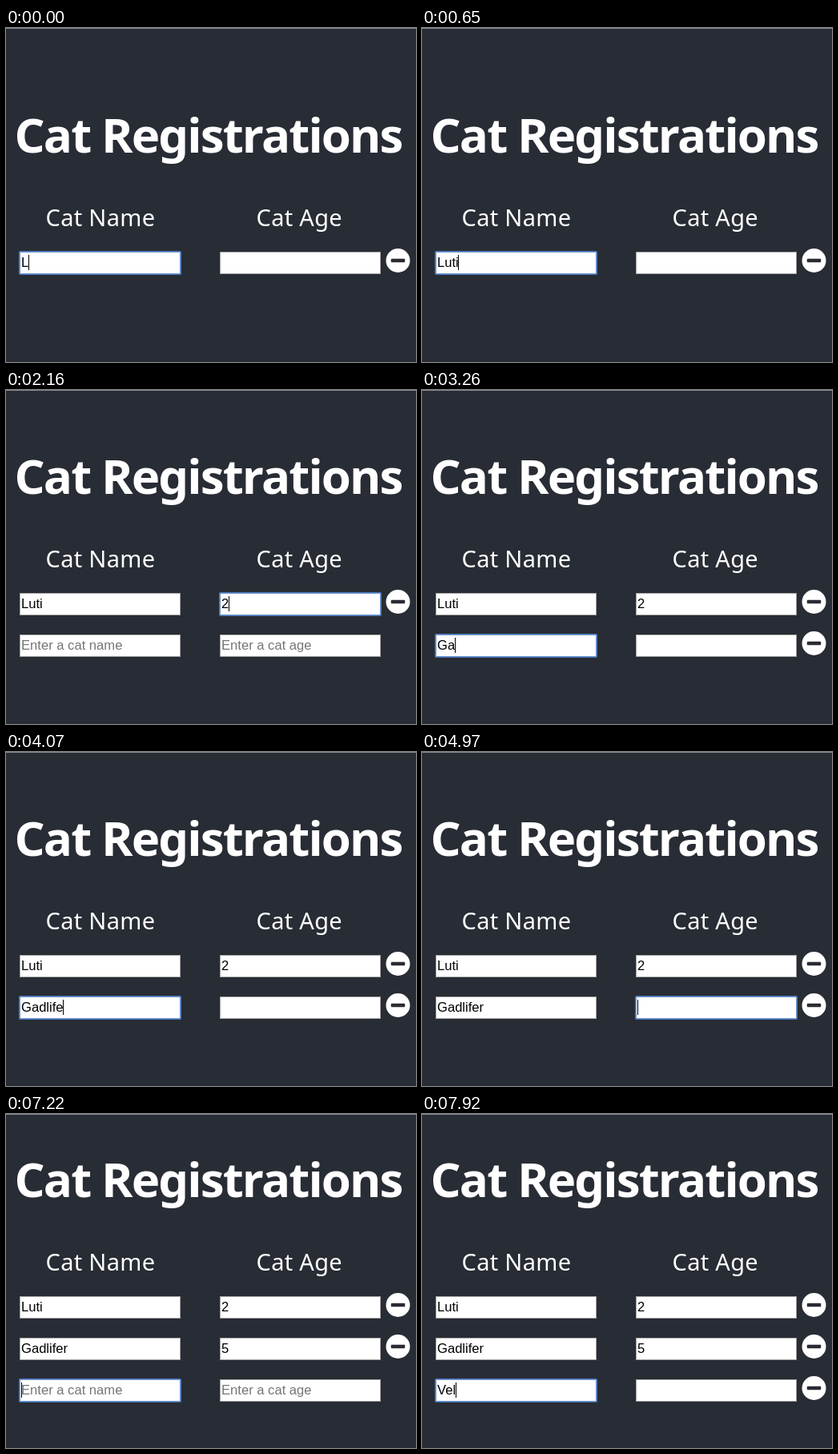
Animation, 512 px wide and 418 px high, one loop 8000 ms. Source, as an HTML page with a canvas:

```html
<!DOCTYPE html>
<html lang="en">
<head>
<meta charset="utf-8">
<title>Cat Registrations</title>
<style>
  html, body { margin: 0; width: 100%; height: 100%; overflow: hidden; background: #282c34; }
  canvas { display: block; }
</style>
</head>
<body>
<canvas id="stage" width="512" height="418"></canvas>
<script>
const ctx = document.getElementById('stage').getContext('2d');
const LOOP = 8000, BG = '#282c34';
const FIELD = '16.6px "Liberation Sans", Arial, sans-serif';
const HEAD = '"Noto Sans", "Open Sans", sans-serif';
const COLUMNS = [
  { x: 17, hint: 'Enter a cat name' },
  { x: 267, hint: 'Enter a cat age' }
];

// Typing per field: the text, then the time each letter appears.
const ENTRIES = [
  [['Luti', [0, 120, 400, 650]], ['2', [2160]]],
  [['Gadlifer', [3010, 3260, 3410, 3810, 3810, 3930, 4070, 4190]], ['5', [5360]]],
  [['Vel', [7520, 7800, 7920]], ['', []]]
];
// Time, row and column of each focus change.
const FOCUS = [[0, 0, 0], [1330, 0, 1], [2450, 1, 0], [4970, 1, 1], [6260, 2, 0]];
const CARET_OFF = [[1180, 1330], [1860, 2160], [4720, 4970], [5980, 6260], [6690, 7220]];
const ROW_ADDED = [0, 2160, 5360];

function text(str, x, y, font, color, spacing = 0) {
  ctx.font = font;
  ctx.letterSpacing = spacing + 'px';
  ctx.fillStyle = color;
  ctx.fillText(str, x, y);
}

function box(x, y, w, h, radius, color) {
  ctx.fillStyle = color;
  ctx.beginPath();
  ctx.roundRect(x, y, w, h, radius);
  ctx.fill();
}

function removeButton(y) {
  box(474.5, y - 15, 30, 30, 15, '#fff');
  box(480.75, y - 2.25, 17.5, 4.5, 1, BG);
}

function field({ x, hint }, y, value, showHint, focused, caret) {
  if (focused) box(x - 1, y - 1, 203, 30, 2, '#4a7bc8');
  box(x, y, 201, 28, 0, focused ? '#6f92c4' : '#a5a5a5');
  box(x + 1, y + 1, 199, 26, 0, '#fff');

  text(showHint ? hint : value, x + 2, y + 19, FIELD, showHint ? '#757575' : '#000');
  if (caret) {
    box(Math.floor(x + 2 + ctx.measureText(value).width), y + 4, 1, 19, 0, '#000');
  }
}

function draw(t) {
  const rows = ROW_ADDED.filter(start => t >= start).length;
  const shift = -26 * (rows - 1);
  const [, focusRow, focusCol] = FOCUS.filter(f => t >= f[0]).pop();
  const caretOn = !CARET_OFF.some(([from, to]) => t >= from && t < to);

  box(0, 0, 512, 418, 0, BG);
  box(0, 0, 512, 1, 0, '#85888c');

  text('Cat Registrations', 10.5, 156 + shift, 'bold 60px ' + HEAD, '#fff', -1.9);
  text('Cat Name', 49.5, 248 + shift, '29px ' + HEAD, '#fff', 0.3);
  text('Cat Age', 312.5, 248 + shift, '29px ' + HEAD, '#fff', 0.3);

  for (let row = 0; row < rows; row++) {
    const y = 280 + shift + 52 * row;
    const values = ENTRIES[row].map(([str, times]) =>
      str.slice(0, times.filter(at => t >= at).length));
    const empty = !values.join('');
    values.forEach((value, col) => {
      const focused = row === focusRow && col === focusCol;
      field(COLUMNS[col], y, value, empty, focused, focused && caretOn);
    });
    if (!empty) removeButton(y + 11);
  }
}

function tick() {
  draw(performance.now() % LOOP);
  requestAnimationFrame(tick);
}
tick();
</script>
</body>
</html>
```
